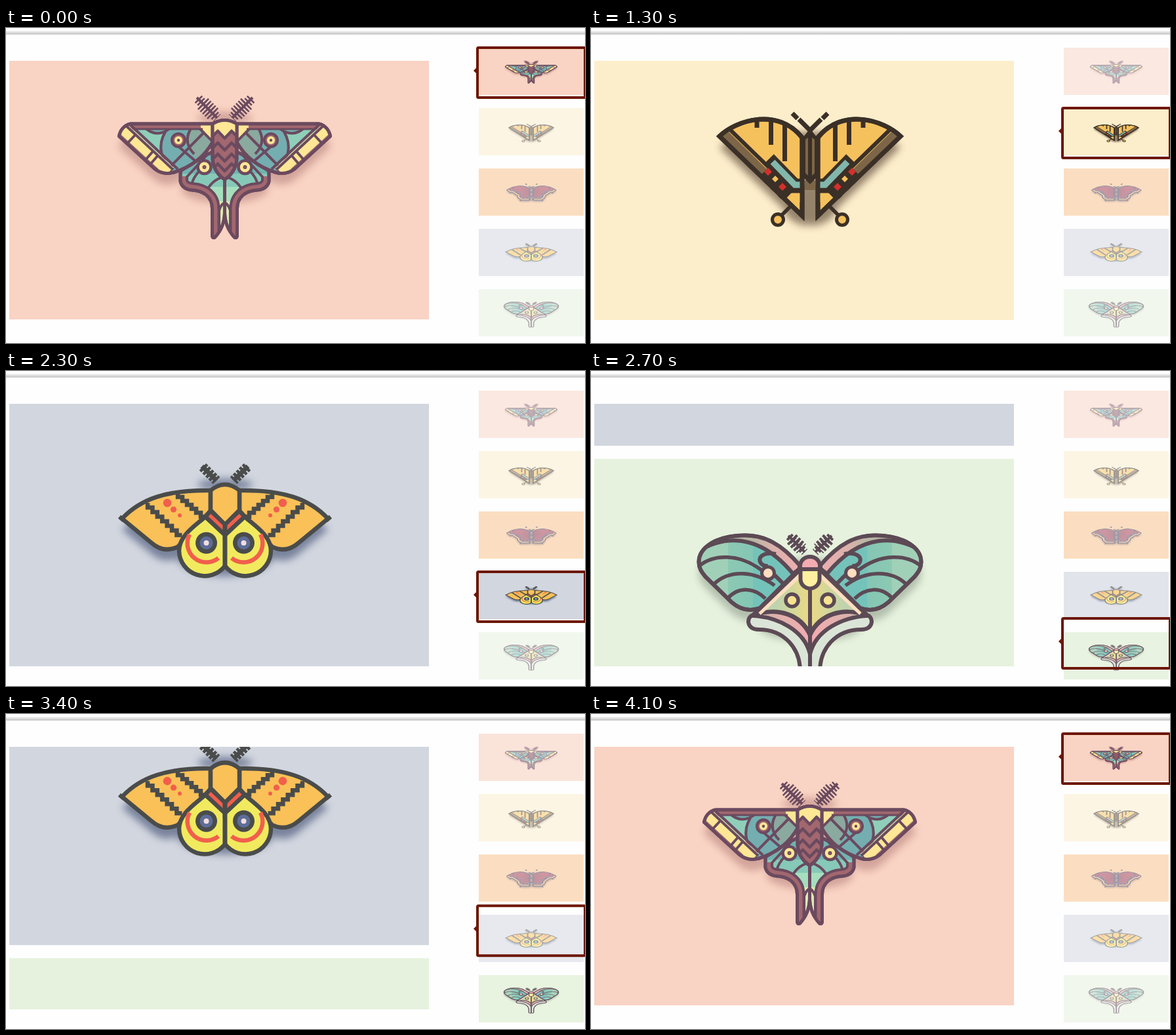
An HTML page for the animation above (5.4 s loop, 883 by 480 pixels).

```html
<!DOCTYPE html>
<html lang="en">
<head>
<meta charset="utf-8">
<title>Moth gallery</title>
<style>
html, body { margin: 0; width: 100%; height: 100%; overflow: hidden; background: #fefefe; }
svg { display: block; }
.ln { fill: none; }
.no { stroke: none; }
</style>
</head>
<body>
<svg id="stage" width="883" height="480" viewBox="0 0 883 480">
<defs>
  <linearGradient id="bar" x2="0" y2="1"><stop stop-color="#fafafa"/><stop offset=".5" stop-color="#dadada"/><stop offset="1" stop-color="#c6c6c6"/></linearGradient>
  <filter id="blur" x="-20%" y="-40%" width="140%" height="180%"><feGaussianBlur stdDeviation="6"/></filter>
  <clipPath id="view"><rect x="5" y="50" width="640" height="400"/></clipPath>

  <!-- wing outlines -->
  <path id="u0" d="M316 146H190C180 148 174 156 172.500 165L226 214Q240 225 256 220C282 212 303 196 316 172Z"/>
  <path id="u1" d="M196 165C220 141 285 120 322 167V286Z"/>
  <path id="u2" d="M182 191C225 141 285 141 324 174V286H273L250 263V244L213 208H201Z"/>
  <path id="u3" d="M177 225C205 195 245 181 312 182V213L262 268Q240 278 222 262Z"/>
  <path id="u4" d="M318 163C290 130 264 117.500 235 117.500C190 117.500 164.500 137 164.500 158C164.500 167 168 173 175 181L214 219Q235 237 258 228L318 168Z"/>
  <path id="low0" d="M266 218V234Q269 246 284 247C302 248 314.500 258 314.500 275V316Q314.500 321 318.500 319C328 309 333 296 333.500 282V180L300 196Z"/>
  <path id="trunk0" d="M315 146Q333.500 135 352 146V200Q350 220 333.500 231Q317 220 315 200Z"/>
  <clipPath id="cu0"><use href="#u0"/></clipPath>
  <clipPath id="cu1"><use href="#u1"/></clipPath>
  <clipPath id="cu4"><use href="#u4"/></clipPath>
  <clipPath id="cl0"><use href="#low0"/></clipPath>
  <clipPath id="ct0"><use href="#trunk0"/></clipPath>

  <linearGradient id="mint" gradientUnits="userSpaceOnUse" x1="0" y1="200" x2="0" y2="300">
    <stop offset=".22" stop-color="#72b3b1"/><stop offset=".22" stop-color="#86c9b8"/><stop offset=".42" stop-color="#86c9b8"/>
    <stop offset=".42" stop-color="#a5dfbd"/><stop offset=".64" stop-color="#a5dfbd"/><stop offset=".64" stop-color="#dceab0"/>
  </linearGradient>
  <radialGradient id="wine" gradientUnits="userSpaceOnUse" cx="335" cy="210" r="75"><stop stop-color="#742c40"/><stop offset="1" stop-color="#9f3147"/></radialGradient>
  <linearGradient id="sea" gradientUnits="userSpaceOnUse" x1="162" y1="0" x2="320" y2="0">
    <stop offset=".3" stop-color="#a1d0b8"/><stop offset=".3" stop-color="#8cc9b3"/><stop offset=".54" stop-color="#84c6b4"/><stop offset=".54" stop-color="#74c3ba"/>
  </linearGradient>
  <linearGradient id="rose" gradientUnits="userSpaceOnUse" x1="162" y1="0" x2="334" y2="0">
    <stop offset=".5" stop-color="#b8b6a5"/><stop offset=".65" stop-color="#d9b2ab"/><stop offset="1" stop-color="#f4acb1"/>
  </linearGradient>
  <linearGradient id="straw" gradientUnits="userSpaceOnUse" x1="250" y1="0" x2="334" y2="0">
    <stop offset=".4" stop-color="#bfd3ae"/><stop offset=".75" stop-color="#d9d895"/><stop offset="1" stop-color="#ecd985"/>
  </linearGradient>

  <!-- left halves -->
  <g id="h0" stroke="#6b4a5f" stroke-width="5" stroke-linejoin="round">
    <path class="ln" stroke-width="23" stroke-dasharray="2.600 2.400" d="M300 115L316 131"/>
    <path class="ln" stroke-width="15" stroke-dasharray="2.600 2.400" d="M293 108L322 137"/>
    <path class="ln" stroke-width="4" d="M291 106L322 137"/>
    <use href="#low0" fill="url(#mint)"/>
    <g clip-path="url(#cl0)" class="ln">
      <path class="ln" stroke-width="4" d="M262 242L306 194M282 246Q283 226 302 212M306 250Q312 232 334 226M318 206L334 222"/>
      <path class="ln" stroke-width="24" d="M266 226V234Q269 246 284 247C302 248 314.500 258 314.500 275V322"/>
      <path class="ln" stroke="#a2676f" stroke-width="16" d="M266 226V234Q269 246 284 247C302 248 314.500 258 314.500 275V322"/>
      <path class="ln" stroke-width="4" d="M325 320V278Q328 268 334 266"/>
    </g>
    <use href="#low0" fill="none"/>
    <use href="#u0" fill="#74aeb0"/>
    <g clip-path="url(#cu0)">
      <path class="no" fill="#8fcfba" d="M190 146H248Q224 180 250 216L240 222Z"/>
      <path class="no" fill="#74aeb0" d="M211 146Q230 170 250 154L240 146Z"/>
      <path class="no" fill="#8aa99f" d="M284 146H318V182L292 200Q262 176 284 146Z"/>
      <path class="no" fill="#ffe795" d="M291 146H318V174Z"/>
      <path class="ln" stroke-width="4" d="M249 150Q222 182 252 218M211 151Q229 169 250 153M284 150Q268 173 287 192M303 158L244 218M292 150L318 176M260 178L302 214"/>
      <path class="ln" stroke="#a2676f" stroke-width="6" d="M185 150H297"/>
      <path class="ln" stroke-width="3" d="M190 154H300"/>
      <path class="ln" stroke="#ffe795" stroke-width="18" d="M174 149L249 219"/>
      <path class="ln" stroke="#a2676f" stroke-width="7" d="M172 164L230 217"/>
      <path class="ln" stroke-width="4" d="M182 148L255 216M190 148L262 215M182 179L197 163M211 203L224 188M218 210L231 195"/>
    </g>
    <use href="#u0" fill="none"/>
    <circle cx="263" cy="171" r="10" fill="#a2676f" stroke-width="4"/>
    <circle class="no" cx="263" cy="171" r="6" fill="#ffe795"/><circle class="no" cx="263" cy="171" r="2.200" fill="#6b4a5f"/>
    <circle cx="302.500" cy="212" r="10" fill="#ffe795" stroke-width="4.500"/>
    <circle cx="302.500" cy="212" r="2" fill="#a2676f" stroke-width="2"/>
  </g>
  <g id="b0" stroke="#6b4a5f" stroke-width="5" stroke-linejoin="round">
    <path d="M333.500 228V284"/>
    <use href="#trunk0" fill="#a2676f"/>
    <g clip-path="url(#ct0)">
      <path class="no" fill="#ffe795" d="M312 130H355V167L344 156L333.500 167L323 156L312 167Z"/>
      <path id="zig" class="ln" stroke-width="4.500" d="M312 168L323 157L333.500 168L344 157L355 168"/>
      <use href="#zig" y="18"/><use href="#zig" y="35"/><use href="#zig" y="50"/>
    </g>
    <use href="#trunk0" fill="none"/>
  </g>

  <g id="h1" stroke="#3b3027" stroke-width="7">
    <path class="ln" stroke-width="5.500" d="M310 266L289 287"/>
    <circle cx="285" cy="292" r="8.500" fill="#f5c15d" stroke-width="5"/>
    <path class="ln" d="M271 228L264 235M282 239L275 246M294 251L287 258"/>
    <use href="#u1" fill="#f5c15d"/>
    <g clip-path="url(#cu1)">
      <path class="ln" d="M253 130V152M274.500 130V178M295.500 130V203"/>
      <path class="ln" stroke="#7d6648" stroke-width="12" d="M200 157L272 227"/>
      <path class="ln" stroke-width="6" d="M207 150L278 219"/>
      <path class="ln" stroke-width="23" d="M266 217L304 253"/>
      <path class="ln" stroke-width="19" d="M272 199L311 239H330"/>
      <path class="ln" stroke="#82b7ac" stroke-width="9.500" d="M277 204L311 239H330"/>
      <path class="ln" stroke-width="5" d="M300 249H326"/>
      <path class="no" fill="#f5c15d" d="M305 252H319V266Z"/>
    </g>
    <use href="#u1" fill="none"/>
    <path class="no" fill="#d5302c" d="M270 213l6 6-6 6-6-6zM292 236l6 6-6 6-6-6z"/>
    <path class="no" fill="#f5c15d" d="M281 225l5 5-5 5-5-5z"/>
    <path class="ln" d="M317 139L334 156M307 130L315 138"/>
  </g>
  <g id="b1">
    <path fill="#7d6648" d="M326 232H342V247H326Z"/>
    <path fill="#3b3027" d="M324 166L334 153L344 166V228L334 238L324 228Z"/>
    <path fill="#7d6648" d="M327 170l4-3v58l-4-4zM341 170l-4-3v58l4-4z"/>
  </g>

  <g id="h2" stroke="#3d3450" stroke-width="7">
    <path class="ln" stroke-width="8" d="M211 211L200 222M273 286L262 297M297 130L307 140M319 154L335 170"/>
    <use href="#u2" fill="url(#wine)"/>
    <path class="ln" stroke-width="8" d="M221.500 160V179"/>
    <path class="ln" stroke-width="20" d="M187 192L206 204H220L256 240V258L275 277H326"/>
    <path class="ln" stroke="#fcb467" stroke-width="7.500" d="M188 189L205 204H219L256 241V258L275 277H320"/>
    <path class="ln" d="M324 172V289M182 191L188 184"/>
    <g fill="#8f97d2" stroke-width="5.500">
      <circle cx="233.500" cy="197" r="7"/><circle cx="249" cy="213" r="5.500"/><circle cx="264" cy="229.500" r="5.500"/>
      <circle cx="274" cy="254" r="6.500"/><circle cx="295.500" cy="263" r="6"/><circle cx="319" cy="263" r="6"/>
    </g>
  </g>
  <g id="b2" stroke="#3d3450" stroke-width="7">
    <path fill="#7c6068" d="M324 179L335 168L346 179V243L335 255L324 243Z"/>
    <path class="ln" d="M324 203L335 214L346 203"/>
  </g>

  <g id="h3" stroke="#4a4c4b" stroke-width="6.500">
    <path class="ln" stroke-width="15" stroke-dasharray="4.500 2" d="M300 146L321 167"/>
    <path class="ln" stroke-width="7" d="M299 145L321 167"/>
    <use href="#u3" fill="#f9c158"/>
    <path class="ln" d="M173 222L180 228"/>
    <path class="ln" d="M262 186v6h7v6h7v6h7v6h7v6h7v6h7M216 201v7h7.400v7h7.400v7h7.400v7h7.400v7h7.400v7h7.400v7h8"/>
    <g class="no" fill="#f15f4c"><circle cx="246" cy="201" r="6.300"/><circle cx="255.500" cy="211" r="4.600"/><circle cx="265" cy="220" r="3"/></g>
    <path fill="#f1ea5e" d="M334 248L304 222C290 235 264 250 264 274A39 39 0 0 0 334 297Z"/>
    <path class="ln" stroke="#f15f4c" d="M280 249A29 29 0 0 0 324 285"/>
    <path fill="#f15f4c" d="M334 250L304 222L312 213L334 233Z"/>
    <circle class="no" cx="305.500" cy="262" r="16.500" fill="#4a4c4b"/><circle class="no" cx="305.500" cy="262" r="10" fill="#5e6d98"/><circle class="no" cx="305.500" cy="262" r="4" fill="#f3dde0"/>
  </g>
  <g id="b3" stroke="#4a4c4b" stroke-width="6.500">
    <path d="M334 230V300"/>
    <path fill="#f9c158" d="M312 182Q334 164 356 182V212L334 234L312 212Z"/>
  </g>

  <g id="h4" stroke="#5c4a55" stroke-width="6" stroke-linejoin="round">
    <path class="ln" stroke-width="20" stroke-dasharray="4 2.500" d="M306 123L321 138"/>
    <path class="ln" stroke-width="12" stroke-dasharray="4 2.500" d="M302 119L326 143"/>
    <path class="ln" stroke-width="4" d="M301 118L326 143"/>
    <path fill="#dbe5d7" d="M252 239Q240 238 240 250Q242 261 256 261C295 261 319 290 319 325V350Q320 358 327 358Q334 358 334 350V298C325 262 285 240 252 239Z"/>
    <path fill="url(#rose)" d="M246 240C285 225 320 240 334 270V298C325 262 285 242 246 240Z"/>
    <path fill="url(#straw)" d="M334 155L246 240C285 225 320 238 334 268Z"/>
    <path class="ln" stroke="#ffdfc0" stroke-width="8" d="M322 174L256 236"/>
    <path class="ln" d="M326 163L245 241"/>
    <use href="#u4" fill="url(#sea)"/>
    <g clip-path="url(#cu4)">
      <path fill="url(#rose)" d="M162 143C200 118 255 112 308 176L330 160L290 105L160 100Z"/>
      <path class="ln" stroke-width="5.500" d="M164 165C186 146 226 144 262 172M187 192C210 170 248 170 280 194M208 214C226 194 250 198 266 214"/>
      <path class="ln" d="M282 146C262 142 252 152 260 161Q264 165 270 164M280 178L292 190"/>
    </g>
    <use href="#u4" fill="none"/>
    <circle cx="270" cy="175" r="9.500" fill="#ffdfc0" stroke-width="5"/>
    <circle cx="306.500" cy="216.500" r="9.500" fill="#f6e28f" stroke-width="5.500"/>
  </g>
  <g id="b4" stroke="#5c4a55" stroke-width="6" stroke-linejoin="round">
    <path d="M334 190V352"/>
    <path fill="#f4acb1" d="M319 169V164A15 14 0 0 1 349 164V169Z"/>
    <path fill="#fff0a0" d="M319.500 169H348.500V184A14.500 14.500 0 0 1 319.500 184Z"/>
  </g>
</defs>

<rect y="4" width="883" height="6" fill="url(#bar)"/>
<g clip-path="url(#view)"><g id="strip"></g></g>
<g id="thumbs"></g>
<g id="frame" fill="#6d1703">
  <rect x="719" y="30" width="164" height="76" rx="1.500" fill="none" stroke="#6d1703" stroke-width="4"/>
  <path d="M713 65L718 60V70Z"/>
</g>
</svg>
<script>
const LOOP = 5400, TICK = 100, PITCH = 470, GAP = 92;
const $ = id => document.getElementById(id);

// axis: twice the mirror line; dy: thumbnail lift; head: shadow height at the antennae; low: shadow under the lower wings [cy, rx, ry]
const art = [
  { bg: '#f9d3c3', tall: 443, shade: '#a8716f', alpha: .48, axis: 667, dy: 3, head: 120, low: [228, 66, 22] },
  { bg: '#fdeecb', tall: 444, shade: '#4a3426', alpha: .58, axis: 668, dy: 3.5, head: 150, low: [252, 42, 32] },
  { bg: '#fac086', tall: 450, shade: '#54343a', alpha: .6, axis: 670, dy: 2.5, head: 150, low: [248, 66, 32] },
  { bg: '#d2d6df', tall: 450, shade: '#3c4b70', alpha: .6, axis: 668, dy: -.7, head: 156, low: [264, 74, 32] },
  { bg: '#e6f2dd', tall: 450, shade: '#7e8b7b', alpha: .5, axis: 668, dy: .8, head: 145, low: [240, 78, 22] }
];

// [start, target slide, duration]
const moves = [[650, 1, 500], [1350, 2, 500], [1930, 3, 360], [2500, 4, 450], [3312, 0, 500]];

const pair = (id, axis) =>
  `<use href="#${id}"/><use href="#${id}" transform="matrix(-1 0 0 1 ${axis} 0)"/>`;

const moth = (a, i) => `<g id="m${i}">
  <g filter="url(#blur)" fill="${a.shade}" opacity="${a.alpha}" transform="translate(0 17)">
    ${pair('u' + i, a.axis)}
    <ellipse cx="${a.axis / 2}" cy="${a.head}" rx="42" ry="9"/>
    <ellipse cx="${a.axis / 2}" cy="${a.low[0]}" rx="${a.low[1]}" ry="${a.low[2]}"/>
  </g>
  ${pair('h' + i, a.axis)}<use href="#b${i}"/></g>`;

$('strip').innerHTML = art.map((a, i) =>
  `<g transform="translate(0 ${i * PITCH})">
    <rect x="5" y="1" width="640" height="${a.tall}" fill="${a.bg}"/>${moth(a, i)}</g>`).join('');

$('thumbs').innerHTML = art.map((a, i) =>
  `<g transform="translate(721 ${30 + i * GAP})"><rect width="160" height="72" fill="${a.bg}"/>
    <use href="#m${i}" transform="translate(-1.8 ${a.dy}) scale(.245 .16)"/></g>`).join('');

const thumbs = [...$('thumbs').children];

// cubic-bezier(.25, 0, .25, 1)
function ease(x) {
  if (x >= 1) return 1;
  let lo = 0, hi = 1;
  for (let i = 0; i < 24; i++) {
    const u = (lo + hi) / 2;
    if (.75 * u * (1 - u) + u ** 3 < x) lo = u; else hi = u;
  }
  return lo * lo * (3 - 2 * lo);
}

function stateAt(t) {
  let from = 0, to = 0, e = 1;
  for (const [start, target, span] of moves) {
    if (t < start) break;
    from = to;
    to = target;
    e = ease((t - start) / span);
  }
  return { from, to, e, pos: from + (to - from) * e };
}

function draw() {
  const t = Math.floor(performance.now() % LOOP / TICK) * TICK;
  const s = stateAt(t), lead = stateAt(t + 20);
  $('strip').setAttribute('transform', `translate(0 ${-s.pos * PITCH})`);
  $('frame').setAttribute('transform', `translate(0 ${lead.pos * GAP})`);
  thumbs.forEach((el, i) => {
    const on = i === s.to ? s.e : i === s.from ? 1 - s.e : 0;
    el.setAttribute('opacity', .5 + .5 * on);
  });
  requestAnimationFrame(draw);
}
draw();
</script>
</body>
</html>
```
